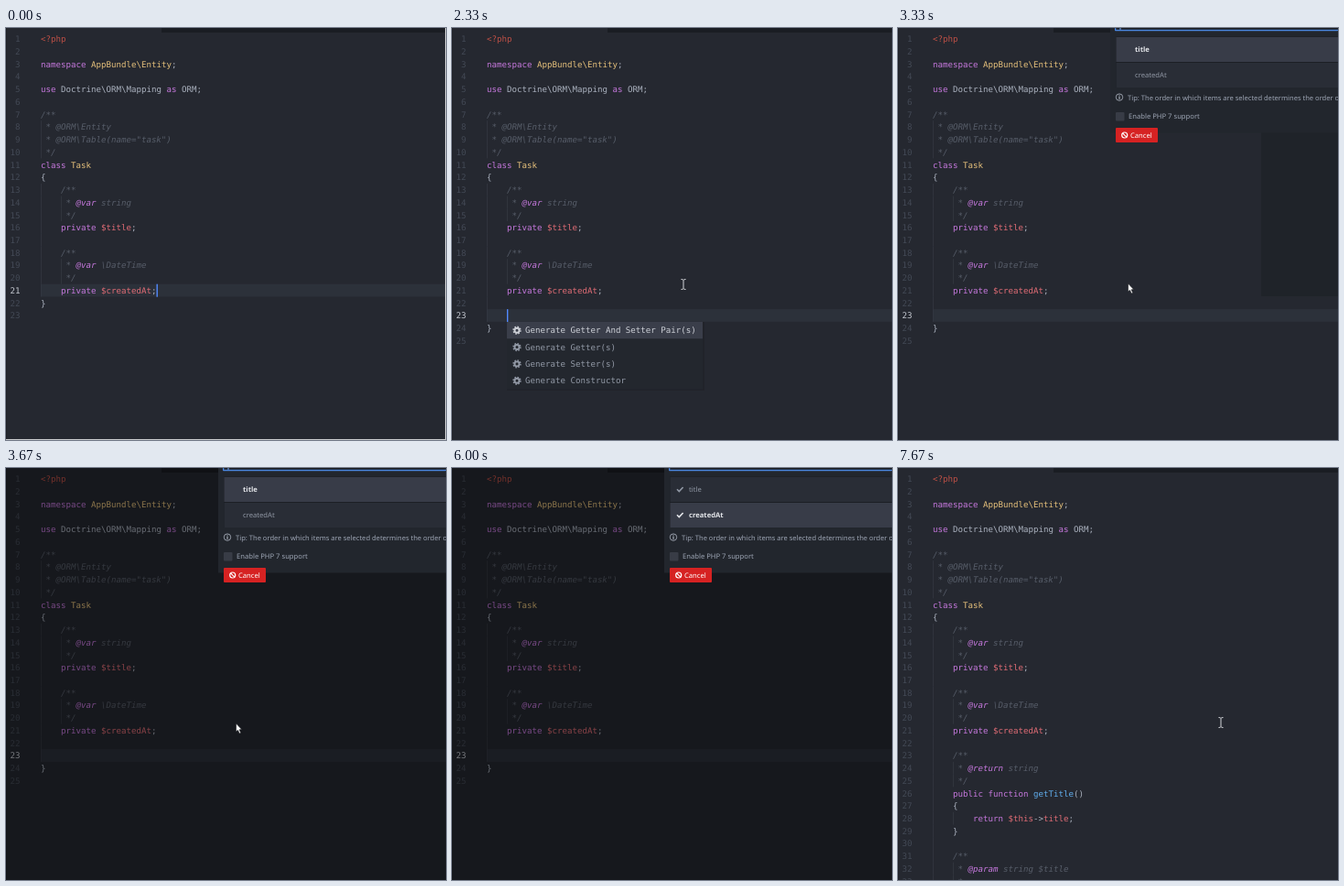
These frames come from a looping animation (481 px wide and 450 px high, 8000 ms). An HTML page:

```html
<!DOCTYPE html>
<html lang="en">
<head>
<meta charset="utf-8">
<title>Generate getters</title>
<style>
  html, body { margin: 0; width: 100%; height: 100%; overflow: hidden; background: #252830; }
  svg { display: block; width: 481px; height: 450px; }
  text { white-space: pre; text-rendering: geometricPrecision; }
  .mono { font: 9.136px "DejaVu Sans Mono", monospace; }
  .ui { font: 7.65px "Noto Sans", "Open Sans", sans-serif; }
  .note { font-style: italic; }
</style>
</head>
<body>
<svg id="stage" viewBox="0 0 481 450" xmlns="http://www.w3.org/2000/svg"></svg>
<script>
const LOOP = 8000, CHAR = 5.5, LEFT = 38, PITCH = 13.73;
const C = {
  text: '#abb2bf', key: '#c678dd', type: '#e5c07b', name: '#e06c75', call: '#61afef',
  tag: '#be5046', note: '#575d69', num: '#434955', numOn: '#c3c7cf', band: '#2c313a'
};
const stage = document.getElementById('stage');

function add(parent, tag, attrs, content) {
  const el = document.createElementNS('http://www.w3.org/2000/svg', tag);
  for (const k in attrs) el.setAttribute(k, attrs[k]);
  if (content !== undefined) el.textContent = content;
  parent.appendChild(el);
  return el;
}
const group = (parent, attrs = {}) => add(parent, 'g', attrs);
const rect = (parent, x, y, width, height, fill, more) =>
  add(parent, 'rect', { x, y, width, height, fill, ...more });
const label = (parent, x, y, fill, cls, str, more) =>
  add(parent, 'text', { x, y, fill, class: cls, ...more }, str);
const show = (el, on) => el.setAttribute('visibility', on ? 'visible' : 'hidden');

const lineTop = n => 5.1 + PITCH * (n - 1);
const baseline = n => 15.3 + PITCH * (n - 1);

const head = String.raw`<?php

namespace AppBundle\Entity;

use Doctrine\ORM\Mapping as ORM;

/**
 * @ORM\Entity
 * @ORM\Table(name="task")
 */
class Task
{
    /**
     * @var string
     */
    private $title;

    /**
     * @var \DateTime
     */
    private $createdAt;`.split('\n');

const methods = String.raw`
    /**
     * @return string
     */
    public function getTitle()
    {
        return $this->title;
    }

    /**
     * @param string $title
     *`.split('\n');

const rules = [
  [/^(namespace|use|as|class|private|public|function|return)$/, C.key],
  [/^(AppBundle\\Entity|Task)$/, C.type],
  [/^(\$\w+|title)$/, C.name],
  [/^getTitle$/, C.call],
  [/^<\?php$/, C.tag]
];

function tokens(line) {
  const note = /^\s*(\/\*|\*)/.test(line);
  const parts = line.match(note ? /@(var|return|param)\b|\s+|[^\s@]+|@\S+/g
                                : /<\?php|\$\w+|[\w\\]+|\s+|[^\s\w$\\]+/g) || [];
  let col = 0;
  return parts.map(str => {
    const at = col;
    col += str.length;
    const rule = rules.find(r => r[0].test(str));
    const fill = note ? (/^@(var|return|param)$/.test(str) ? C.key : C.note)
                      : rule ? rule[1] : C.text;
    return { str, at, fill, note };
  }).filter(t => t.str.trim());
}

// One editor view: current line band, indent guides, gutter and code
function editor(lines, current) {
  const g = group(stage);
  if (current) rect(g, LEFT, lineTop(current), 443, PITCH, C.band);
  lines.forEach((line, i) => {
    const n = i + 1, indent = line.match(/^ */)[0].length;
    const inBody = n > 12 && line !== '}' && n < lines.length && (line || i < lines.length - 2);
    const depth = inBody ? Math.max(1, Math.ceil(indent / 4)) : Math.ceil(indent / 4);
    for (let d = 0; d < depth; d++)
      rect(g, LEFT + d * 4 * CHAR, lineTop(n), 0.7, PITCH, '#353a44');
    label(g, 4.5 + (n < 10 ? CHAR : 0), baseline(n), n === current ? C.numOn : C.num, 'mono', n);
    for (const t of tokens(line))
      label(g, LEFT + t.at * CHAR, baseline(n), t.fill, t.note ? 'mono note' : 'mono', t.str);
  });
  return g;
}

rect(stage, 0, 0, 481, 450, '#252830');
rect(stage, 170, 0, 311, 5, '#1a1d23');
rect(stage, 0, 0, 1, 450, '#1d1f25');

const views = [
  [0, editor([...head, '}', ''], 21)],
  [1330, editor([...head, '', '}', ''], 22)],
  [1670, editor([...head, '', '', '}', ''], 23)],
  [6330, editor([...head, ...methods], 0)]
];

const caret = rect(stage, 0, 0, 1.4, 14, '#528bff');

// Command popup
const popup = group(stage);
rect(popup, 60, 321, 216, 75, '#1e2127', { opacity: 0.6 });
rect(popup, 60, 321, 214, 73.5, '#23272e');
rect(popup, 60, 321, 214, 18.3, '#3a3e4a');
['Getter And Setter Pair(s)', 'Getter(s)', 'Setter(s)', 'Constructor'].forEach((item, i) => {
  const y = 330.2 + i * 18.35, fill = i ? '#9299a6' : '#cdd0d7';
  const gear = group(popup, { transform: `translate(71 ${y})`, fill: 'none', stroke: fill });
  add(gear, 'circle', { r: 2.5, 'stroke-width': 1.9 });
  add(gear, 'circle', { r: 3.9, 'stroke-width': 1.5, 'stroke-dasharray': '1.53 1.53' });
  label(popup, 80, y + 3.2, fill, 'mono', 'Generate ' + item);
});

// Dialog
const shade = rect(stage, 0, 0, 481, 450, '#000', { opacity: 0.4 });
const patch = rect(stage, 397, 114, 84, 179, '#1f2329');
const dialog = group(stage);
rect(dialog, 232, 0, 249, 114.5, '#22262d');
rect(dialog, 237, 0, 244, 3.2, '#4a86e0', { rx: 0.8 });
rect(dialog, 238.3, 0, 243, 1.8, '#1b1e24');
const inputCaret = rect(dialog, 242.5, 0, 1, 1.8, '#7fb0ff');
rect(dialog, 238, 9.5, 243, 55.5, '#1c1f25');

const rows = ['title', 'createdAt'].map((str, i) => {
  const y = 10 + i * 28;
  return {
    back: rect(dialog, 238.5, y, 243, 27, ''),
    text: label(dialog, 259, y + 16, '', 'ui', str),
    tick: add(dialog, 'path', { d: `M246 ${y + 13.3}l2.3 2.3 4.3-4.6`, fill: 'none', 'stroke-width': 1.6 })
  };
});

const info = group(dialog, { transform: 'translate(242 75.6)', fill: '#a4abb7' });
add(info, 'circle', { r: 3.7, fill: 'none', stroke: '#a4abb7', 'stroke-width': 0.9 });
rect(info, -0.6, -2.2, 1.2, 1.1, '#a4abb7');
rect(info, -0.6, -0.6, 1.2, 2.9, '#a4abb7');
label(dialog, 251, 78.5, '#9da5b4', 'ui',
  'Tip: The order in which items are selected determines the order of', { style: 'font-size:7.55px' });
rect(dialog, 238, 92, 9.5, 9.5, '#383c46', { rx: 1 });
label(dialog, 252, 99.4, '#9da5b4', 'ui', 'Enable PHP 7 support');
rect(dialog, 238, 109, 46, 16, '#d62222', { rx: 1 });
add(dialog, 'path', {
  d: 'M245.6 114.9l4.2 4.2M250.7 117a3 3 0 1 1-6 0a3 3 0 1 1 6 0',
  fill: 'none', stroke: '#fff', 'stroke-width': 1.2
});
label(dialog, 254, 120, '#fff', 'ui', 'Cancel');

// Mouse pointers
const beam = add(stage, 'path', {
  d: 'M-2.5-5.5Q0-5.5 0-4.5Q0-5.5 2.5-5.5M0-4.5V4.5M-2.5 5.5Q0 5.5 0 4.5Q0 5.5 2.5 5.5',
  fill: 'none', stroke: '#d4d6da', 'stroke-width': 1
});
const arrow = add(stage, 'path', {
  d: 'M0 0V9L2 7.3L3.6 11L5.2 10.3L3.6 6.8L6.2 6.6Z', transform: 'translate(251.5 279)',
  fill: '#fff', stroke: '#15171b', 'stroke-width': 0.6
});

// Light outer edge seen only at the opening
const edge = group(stage);
rect(edge, 480, 0, 1, 450, '#c9cacc');
rect(edge, 0, 449, 481, 1, '#c9cacc');

// Steps: [start, value]
const carets = [[0, [164.5, 21]], [670, null], [1000, [164.5, 21]], [1330, [60, 22]],
  [1670, null], [2330, [60, 23]], [2670, null], [3000, [60, 23]], [3330, null]];
const beams = [[0, null], [1670, [253, 280]], [3330, null], [7000, [311, 238]],
  [7330, [252, 252]], [7670, [353, 278]]];
const inputBlink = [[0, true], [4000, false], [4330, true], [4670, false], [5000, true], [5670, false]];

const at = (steps, t) => steps.reduce((v, s) => t >= s[0] ? s[1] : v, null);
const within = (t, a, b) => t >= a && t < b;

function draw(t) {
  const view = at(views, t);
  views.forEach(v => v[1].setAttribute('display', v[1] === view ? 'inline' : 'none'));

  const spot = at(carets, t);
  show(caret, spot);
  if (spot) {
    caret.setAttribute('x', spot[0]);
    caret.setAttribute('y', lineTop(spot[1]));
  }

  show(popup, within(t, 2000, 3330));
  show(patch, within(t, 3330, 3670));
  show(shade, within(t, 3670, 6330));
  dialog.setAttribute('display', within(t, 3330, 6330) ? 'inline' : 'none');
  show(inputCaret, at(inputBlink, t));

  const active = t < 5670 ? 0 : 1;
  rows.forEach((row, i) => {
    const on = i === active, fill = on ? '#e4e6ea' : '#9198a5';
    row.back.setAttribute('fill', on ? '#383c48' : '#292d36');
    row.text.setAttribute('fill', fill);
    row.text.setAttribute('font-weight', on ? 600 : 400);
    row.text.style.fontWeight = on ? 600 : 400;
    row.tick.setAttribute('stroke', fill);
    show(row.tick, t >= (i ? 5670 : 5330));
  });

  const pos = at(beams, t);
  show(beam, pos);
  if (pos) beam.setAttribute('transform', `translate(${pos})`);
  show(arrow, within(t, 3330, 5000));
  show(edge, t < 330);
}

function tick() {
  draw(performance.now() % LOOP);
  requestAnimationFrame(tick);
}
tick();
</script>
</body>
</html>
```
